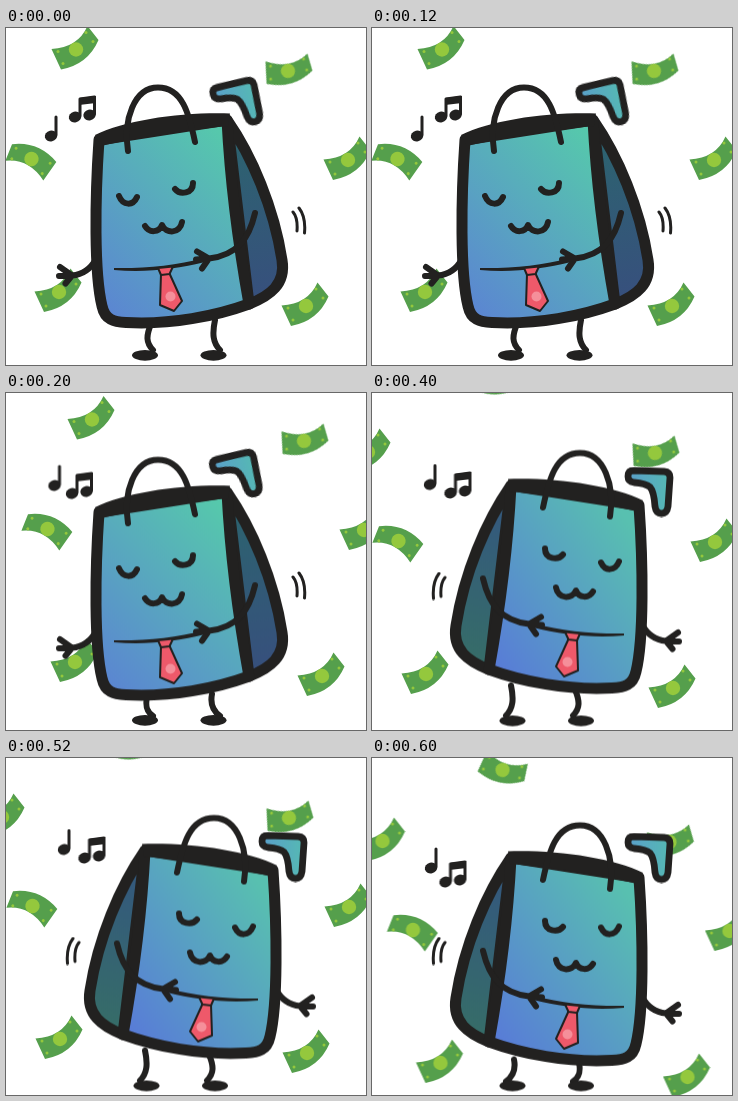
Recreate the animation shown at these times as an HTML page. Size 360x337 px, loop 0.8 s.

```html
<!DOCTYPE html>
<html lang="en">
<head>
<meta charset="utf-8">
<title>Dancing bag</title>
<style>
  html, body { margin: 0; width: 100%; height: 100%; overflow: hidden; background: #fff; }
  svg { display: block; width: 100%; height: 100%; }

  .ink { fill: #222120; }
  .line { fill: none; stroke: #222120; stroke-width: 6; stroke-linecap: round; stroke-linejoin: round; }
  .thick { stroke: #222120; stroke-width: 11; stroke-linejoin: round; }
  .front { fill: var(--front); }
  .side { fill: var(--side); }

  /* Every part holds its pose for a quarter of the loop. */
  .drift, .first, .second, .flip, .legs, .bob, .leg, .eye, .cap, .note, .pair {
    animation: 800ms step-end infinite;
  }
  .drift { animation-name: drift; }
  .first { animation-name: first; }
  .second { animation-name: second; }
  .flip { animation-name: flip; }
  .legs { animation-name: turn; }
  .bob { animation-name: bob; }
  .up { animation-name: first-beat; }
  .down { animation-name: second-beat; }
  .eye { animation-name: eye; }
  .cap { animation-name: cap; }
  .note { animation-name: note; }
  .pair { animation-name: pair; }

  @keyframes drift {
    0% { transform: translate(0, 0); }
    25% { transform: translate(16px, 5px); }
    50% { transform: translate(1px, 17px); }
    75% { transform: translate(15.5px, 41px); }
  }
  @keyframes first { 0% { visibility: visible; } 50%, 100% { visibility: hidden; } }
  @keyframes second { 0% { visibility: hidden; } 50%, 100% { visibility: visible; } }
  @keyframes first-beat {
    0%, 50% { visibility: visible; }
    25%, 75% { visibility: hidden; }
  }
  @keyframes second-beat {
    0%, 50% { visibility: hidden; }
    25%, 75% { visibility: visible; }
  }
  @keyframes flip {
    0% { transform: none; --front: url(#frontL); --side: url(#sideL); }
    50%, 100% { transform: translate(360px, .5px) scale(-1, 1); --front: url(#frontR); --side: url(#sideR); }
  }
  @keyframes turn {
    0% { transform: none; }
    50%, 100% { transform: translate(348px, .5px) scale(-1, 1); }
  }
  @keyframes bob {
    0%, 50% { transform: translate(0, 0); }
    25%, 75% { transform: translate(0, 7.3px); }
  }
  /* This eye stays level on the last beat. */
  @keyframes eye {
    0% { transform: none; }
    75%, 100% { transform: translate(0, -7.3px); }
  }
  @keyframes cap {
    0% { transform: translate(246.5px, 51px) rotate(-15deg); }
    25% { transform: translate(246px, 58px) rotate(-15deg); }
    50% { transform: translate(298px, 78.5px); }
    75% { transform: translate(298px, 79.5px); }
  }
  @keyframes note {
    0% { transform: translate(45px, 108px); }
    25% { transform: translate(48.5px, 92.5px); }
    50% { transform: translate(58px, 91.5px); }
    75% { transform: translate(59px, 110px); }
  }
  @keyframes pair {
    0% { transform: translate(69px, 89px); }
    25% { transform: translate(66px, 100.5px); }
    50% { transform: translate(78.5px, 100px); }
    75% { transform: translate(73.5px, 124px); }
  }
</style>
</head>
<body>
<svg viewBox="0 0 360 337" preserveAspectRatio="none">
  <defs>
    <linearGradient id="frontL" gradientUnits="userSpaceOnUse" x1="92" y1="278" x2="238" y2="128">
      <stop offset="0" stop-color="#5b85d2"/><stop offset="1" stop-color="#56c8ac"/>
    </linearGradient>
    <linearGradient id="frontR" gradientUnits="userSpaceOnUse" x1="248" y1="262" x2="92" y2="145">
      <stop offset="0" stop-color="#587bd8"/><stop offset="1" stop-color="#58c0b0"/>
    </linearGradient>
    <linearGradient id="sideL" gradientUnits="userSpaceOnUse" x1="235" y1="120" x2="260" y2="268">
      <stop offset="0" stop-color="#2d6270"/><stop offset="1" stop-color="#37507d"/>
    </linearGradient>
    <linearGradient id="sideR" gradientUnits="userSpaceOnUse" x1="230" y1="125" x2="260" y2="262">
      <stop offset="0" stop-color="#345a7c"/><stop offset="1" stop-color="#366c69"/>
    </linearGradient>
    <linearGradient id="capFill">
      <stop offset="0" stop-color="#5a9fca"/><stop offset="1" stop-color="#55b9b3"/>
    </linearGradient>
    <g id="bill">
      <path fill="#559f4c" d="M-24.500-.5Q2-2 11.500-23.500L22.500-9.500Q12 15-15 20Z"/>
      <g fill="#94c83d">
        <circle r="7.200"/>
        <circle cx="-18" cy="2" r="1.500"/><circle cx="10" cy="-17" r="1.500"/>
        <circle cx="17" cy="-8" r="1.500"/><circle cx="-13" cy="14" r="1.500"/>
      </g>
    </g>
    <ellipse id="head" class="ink" rx="6.200" ry="5.400" transform="rotate(-12)"/>
  </defs>

  <g class="drift">
    <use class="first" href="#bill" x="70" y="21.500"/>
    <use href="#bill" transform="translate(282 43) rotate(22)"/>
    <use href="#bill" transform="translate(25.500 131) rotate(240)"/>
    <use href="#bill" x="342" y="132"/>
    <use href="#bill" x="53" y="264"/>
    <use href="#bill" x="300" y="278"/>
    <g class="second">
      <use href="#bill" x="-5" y="42"/>
      <use href="#bill" transform="translate(115 -29) rotate(50)"/>
    </g>
  </g>

  <g class="note">
    <use href="#head"/>
    <path class="line" style="stroke-width:3" d="M5-1V-19"/>
  </g>
  <g class="pair">
    <use href="#head"/>
    <use href="#head" x="14.500" y="-2"/>
    <path class="line" style="stroke-width:3" d="M5-1V-18L19.500-20V-3"/>
    <path class="ink" d="M4-19L21-21V-14L4-12Z"/>
  </g>

  <g class="legs">
    <path class="leg up line" d="M145 296C140 308 140 315 147 322M209 292C206 306 207 315 214 322"/>
    <path class="leg down line" d="M141 304C139 314 141 319 147 323M206 301C204 311 207 318 214 323"/>
    <ellipse class="ink" cx="139" cy="327.300" rx="13" ry="5.400"/>
    <ellipse class="ink" cx="207.500" cy="327.300" rx="13" ry="5.400"/>
  </g>

  <g class="flip">
    <path class="line" style="stroke-width:3" d="M287 184Q292 190 291 203M293 180Q300 189 298.500 205"/>
    <g class="bob">
      <path class="line" d="M90 231Q82 246 66 247.500M54 239L66 247.500M53 248L66 247.500M59.500 255.500L66 247.500"/>

      <path class="side thick" d="M221 92C246 128 268 180 276 232C280 256 264 268 243 276Z"/>
      <path class="front thick" d="M93 112C89 170 88 245 96 278C99 292 108 294 120 294.500C165 297 210 288 243 276C232 215 224 150 221 92Z"/>
      <path class="ink" d="M89 107C120 92 175 84 224 85.500L222 98C180 102 130 110 95 118Z"/>
      <path class="line" d="M122 123C117 92 128 59.500 152 59.500C176 59.500 183 85 189 114"/>

      <g class="line">
        <path class="eye" d="M113 168C117 178 127 178 131 169"/>
        <path d="M169 161C174 167 187 166 187 155"/>
        <path d="M139 198C143 205 153 205 156 197C160 206 174 206 176 194"/>
      </g>

      <path class="ink" d="M108 240C140 240.500 170 237.500 198 230L199 234C170 241 140 245 108 242Z"/>
      <g fill="#ee596a" stroke="#222120" stroke-width="2" stroke-linejoin="round">
        <path d="M155 246L163.500 245.500L176 273L168 283L154 277Z"/>
        <path d="M152 240L167 238.500L163.500 246L155 247Z"/>
      </g>
      <circle cx="164.500" cy="268.500" r="5" fill="#f58f9a"/>

      <path class="line" d="M249 185C243 211 231 227 203 230.500L191 223.500M203 230.500L190 231.500M203 230.500L196 240.500"/>
    </g>
  </g>

  <path class="cap" fill="url(#capFill)" stroke="#222120" stroke-width="6.800" stroke-linejoin="round"
    d="M-36-1L-6 0Q0 .5 0 6L-2 35Q-3 42-8.500 42Q-14 42-15 35Q-16 20-20 15.500Q-24 12-36 11Q-42 10-42 5Q-42-1-36-1Z"/>
</svg>
</body>
</html>
```
